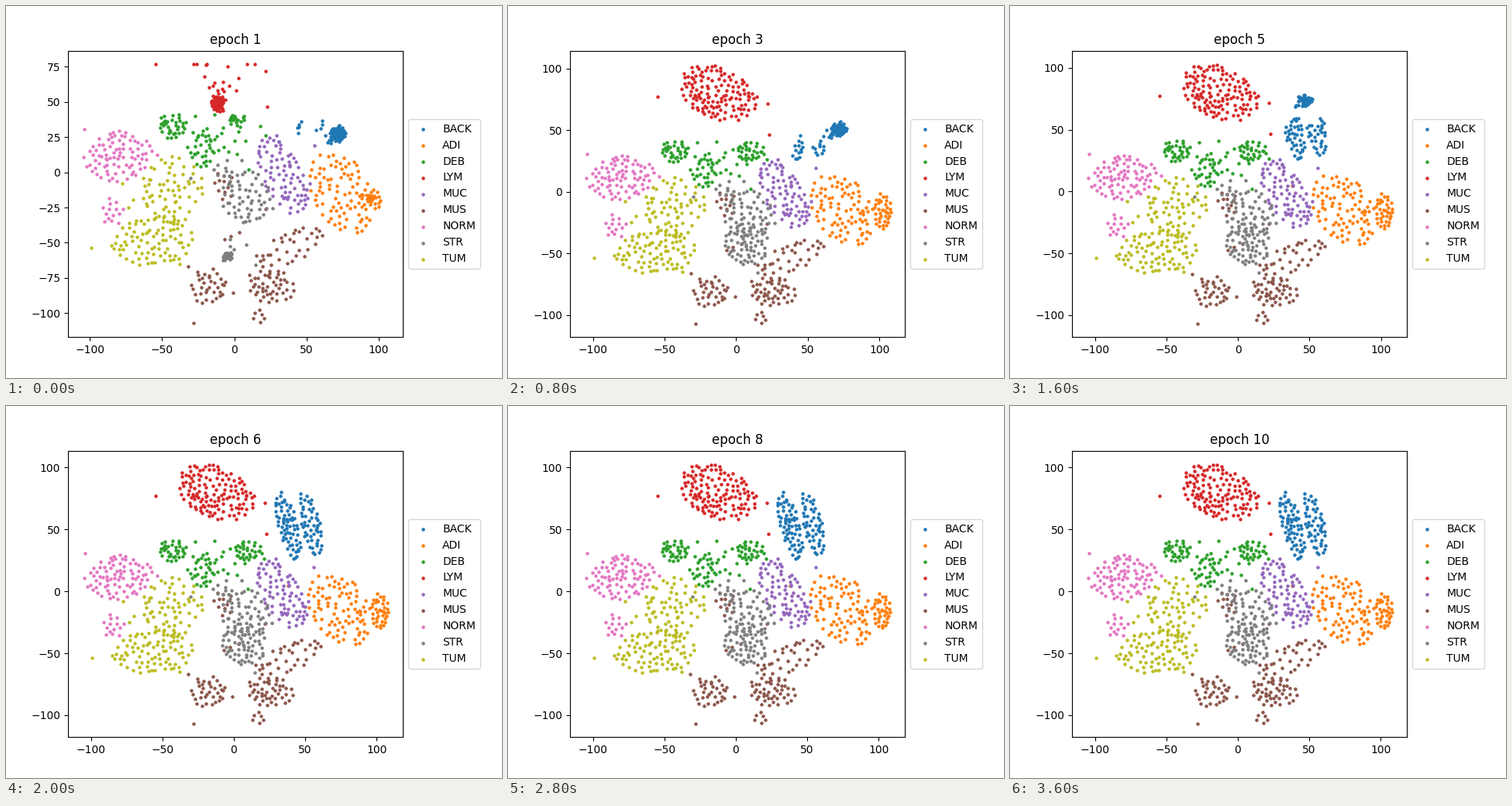
A matplotlib script that plays this animation: 640x480 px, repeating every 4000 ms.

```python
import numpy as np
import matplotlib.pyplot as plt
from matplotlib.animation import FuncAnimation

EPOCHS = 10
rng = np.random.default_rng(11)


def disc(n):
    a, r = rng.uniform(0, 2 * np.pi, n), np.sqrt(rng.uniform(0, 1, n))
    return np.c_[r * np.cos(a), r * np.sin(a)]


class Blob:
    """An ellipse of evenly scattered points.

    With a path, the points start as a tight clump that follows the path;
    the share that has left for home grows by a constant factor per epoch.
    """

    def __init__(self, n, x, y, rx, ry, angle=0, path=(), r=3, growth=2):
        t = np.radians(angle)
        turn = np.array([(np.cos(t), np.sin(t)), (-np.sin(t), np.cos(t))])
        pts = np.empty((0, 2))
        for _ in range(n):
            cand = disc(4) * (rx, ry) @ turn + (x, y)
            gap = np.hypot(*(cand[:, None] - pts).transpose(2, 0, 1))
            pts = np.vstack([pts, cand[gap.min(1, initial=99).argmax()]])
        if path:
            pts = pts[np.hypot(*(pts - path[0]).T).argsort()]
        self.home, self.path, self.growth = pts, path, growth
        self.clump = rng.normal(0, r / 2, (n, 2))

    def at(self, epoch):
        left = len(self.path) - epoch
        if left <= 0:
            return self.home
        pts = self.clump + self.path[epoch]
        done = round(len(pts) * self.growth ** -left)
        pts[:done] = self.home[:done]
        return pts


def strays(n, blobs):
    home = np.vstack([b.home for b in blobs])
    pts = rng.normal(home.mean(0), 1.2 * home.std(0), (n, 2))
    return np.clip(pts, (-104, -107), (106, 77))


back_path = [(71, 27), (78.5, 37), (71, 50.5), (63, 64), (46, 74)]

# label: (number of strays, blobs)
CLASSES = {
    "BACK": (0, [Blob(68, 38, 53, 28, 7, -78, back_path, 5, 1.7),
                 Blob(52, 54, 54, 27, 7, -78, back_path, 5, 1.7)]),
    "ADI": (2, [Blob(88, 74, -14, 31, 20, -65),
                Blob(36, 102, -16, 6, 15, 0, [(94, -19), (97, -20)])]),
    "DEB": (8, [Blob(34, -43, 33, 11, 9),
                Blob(30, -23, 18, 10, 15),
                Blob(12, -4, 24, 14, 13),
                Blob(30, 10, 33, 10, 8, 0, [(-1, 38.5), (4, 39)], 2)]),
    "LYM": (12, [Blob(125, -13, 80, 29, 20, -35,
                      [(-11, 49), (-22, 59.5)], 5, 4)]),
    "MUC": (7, [Blob(75, 33, -3, 30, 14, -65)]),
    "MUS": (10, [Blob(34, -18, -81, 13, 13),
                 Blob(44, 26, -81, 16, 12),
                 Blob(34, 38, -53, 26, 11, 25),
                 Blob(12, -8, -9, 8, 11),
                 Blob(6, 17, -102, 4, 5)]),
    "NORM": (6, [Blob(80, -81, 12, 24, 18, 10),
                 Blob(14, -85, -28, 8, 10)]),
    "STR": (10, [Blob(52, 8, -17, 17, 20),
                 Blob(9, -8, 2, 7, 8),
                 Blob(60, 7, -43, 16, 17, 0,
                      [(-5, -59.5), (1, -57.5)], 2.5, 6)]),
    "TUM": (12, [Blob(82, -57, -49, 29, 18, 5),
                 Blob(60, -43, -12, 22, 24)]),
}
EXTRA = {name: strays(n, blobs) for name, (n, blobs) in CLASSES.items()}

# axis limits at key epochs: x0, x1, y0, y1
KEYS = [0, 1, 2, 3, 5]
LIMITS = np.array([
    (-115.2, 116.7, -117.0, 86.4),
    (-115.1, 117.1, -118.1, 114.6),
    (-116.0, 117.7, -118.0, 114.5),
    (-115.9, 118.0, -117.85, 114.2),
    (-116.1, 118.3, -117.7, 113.6),
])

fig, ax = plt.subplots(figsize=(6.4, 4.8), dpi=100)
fig.subplots_adjust(left=0.125, right=0.8, bottom=0.11, top=0.88)
dots = {name: ax.scatter([], [], s=5, color=f"C{i}", label=name)
        for i, name in enumerate(CLASSES)}
ax.legend(loc="center left", bbox_to_anchor=(1, 0.5))


def draw(epoch):
    for name, (_, blobs) in CLASSES.items():
        parts = [b.at(epoch) for b in blobs]
        dots[name].set_offsets(np.vstack(parts + [EXTRA[name]]))
    x0, x1, y0, y1 = (np.interp(epoch, KEYS, lim) for lim in LIMITS.T)
    ax.set(xlim=(x0, x1), ylim=(y0, y1), title=f"epoch {epoch + 1}")
    return list(dots.values())


anim = FuncAnimation(fig, draw, frames=EPOCHS, interval=400,
                     repeat=True, repeat_delay=0, blit=False)
plt.show()
```
